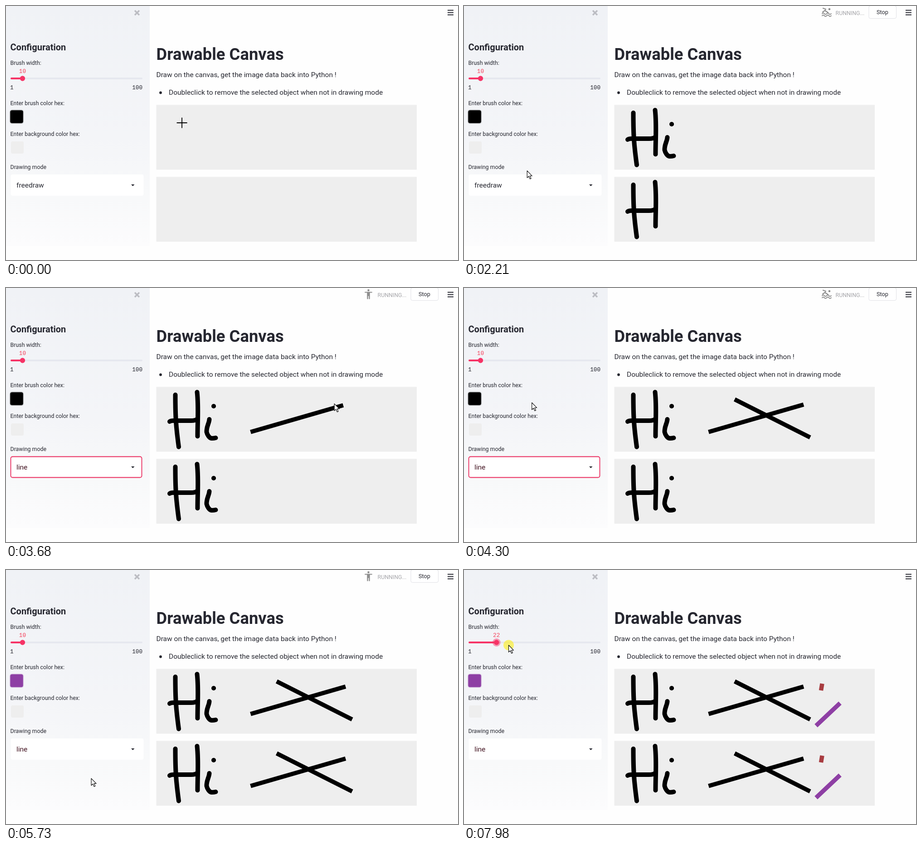
An HTML page for the animation above (8 s loop, 997 px wide and 561 px high).

```html
<!DOCTYPE html>
<html lang="en">
<head>
<meta charset="utf-8">
<title>Drawable Canvas</title>
<style>
  html, body { margin: 0; width: 100%; height: 100%; overflow: hidden; background: #fefefe; }
  svg { display: block; width: 100%; height: 100%; }
  text { font: 15.5px Roboto, sans-serif; fill: #262730; }
  .label { font-size: 12.4px; }
  .mono { font: 12.7px "Liberation Mono", monospace; }
  .h1 { font-size: 36.4px; font-weight: 700; }
  .h2 { font-size: 20px; font-weight: 700; }
  .menu { filter: drop-shadow(0 3px 6px rgba(0, 0, 0, .28)); }
  .muted { fill: #888a92; }
  .icon { fill: none; stroke: #8d8d8d; stroke-width: 1.8; stroke-linecap: round; stroke-linejoin: round; }
  .icon .solid { fill: #8d8d8d; stroke: none; }
  .ink { fill: none; stroke-width: 10; stroke-linecap: round; }
  .ink.line { stroke-width: 9.5; stroke-linecap: butt; }
  .pointer { fill: #fff; stroke: #000; stroke-width: 1.1; stroke-linejoin: round; }
</style>
</head>
<body>
<svg viewBox="0 0 997 561" preserveAspectRatio="none">
  <defs>
    <linearGradient id="side" x2="0" y2="1">
      <stop offset="0" stop-color="#f0f2f6"/>
      <stop offset=".55" stop-color="#f4f5f8"/>
      <stop offset=".8" stop-color="#f8f9fa"/>
      <stop offset="1" stop-color="#fcfcfd"/>
    </linearGradient>
  </defs>

  <rect width="317" height="530" fill="url(#side)"/>
  <path d="M284 10l10 10m0-10l-10 10" stroke="#bcbdc3" stroke-width="3.4"/>
  <text class="h2" x="9.5" y="97.5">Configuration</text>
  <text class="label" x="9.5" y="130">Brush width:</text>
  <rect x="10" y="158" width="291" height="4" rx="2" fill="#e6e8ef"/>
  <rect id="fill" x="10" y="158" height="4" rx="2" fill="#f63366"/>
  <circle id="halo" cy="160" r="9" fill="#f63366" opacity=".45"/>
  <circle id="thumb" cy="160" r="5.7" fill="#f63366"/>
  <text id="value" class="mono" y="147.5" text-anchor="middle" style="fill:#f4405a"></text>
  <text class="mono" x="9" y="184">1</text>
  <text class="mono" x="301" y="184" text-anchor="end">100</text>

  <text class="label" x="9.5" y="219">Enter brush color hex:</text>
  <rect id="swatch" x="9.5" y="230.5" width="28" height="28" rx="3.5"/>
  <text class="label" x="9.5" y="287">Enter background color hex:</text>
  <rect x="11" y="299" width="28" height="27" rx="3.5" fill="#eee"/>

  <text class="label" x="9.5" y="360">Drawing mode</text>
  <rect id="select" y="372" rx="4" fill="#fff"/>
  <text id="mode" x="23" y="401"></text>
  <path d="M276 394h7.5l-3.75 4z" fill="#262730"/>

  <text class="h1" x="331.5" y="119">Drawable Canvas</text>
  <text x="331.5" y="157">Draw on the canvas, get the image data back into Python !</text>
  <circle cx="341" cy="191.5" r="2.9" fill="#262730"/>
  <text x="359" y="196">Doubleclick to remove the selected object when not in drawing mode</text>
  <rect x="331.5" y="218.5" width="574.5" height="143" fill="#eee"/>
  <rect x="331.5" y="377.5" width="574.5" height="143" fill="#eee"/>
  <g id="upper"></g>
  <g id="lower" transform="translate(0 159)"></g>

  <path d="M974 9.5h13m-13 5h13m-13 5h13" stroke="#262730" stroke-width="1.8"/>
  <g id="running">
    <g class="icon">
      <circle class="solid" cx="799.5" cy="5" r="2.3"/>
      <path d="M792 9.5h15"/>
      <path d="M797.5 10v13.5m4-13.5v13.5m-2-13v6" stroke-width="2.4"/>
    </g>
    <g class="icon">
      <circle class="solid" cx="806" cy="7" r="2.3"/>
      <path d="M792 5l6 2-2 3 7 4.5m-12-1l5-3.5" stroke-width="2.2"/>
      <path d="M790 17q3-3 5 0t5 0 5 0 5 0M790 21.5q3-3 5 0t5 0 5 0 5 0"/>
    </g>
    <g class="icon">
      <circle cx="792.5" cy="18.7" r="4.6"/>
      <circle cx="807" cy="18.7" r="4.6"/>
      <circle class="solid" cx="802.5" cy="4.5" r="2.2"/>
      <path d="M808 11h-4l-3.5-3-4 4 4 3v5"/>
    </g>
    <text class="label" x="819.5" y="20" style="fill:#a6a6aa">RUNNING...</text>
    <rect x="893" y="-.5" width="60.5" height="28" rx="3.5" fill="#fff" stroke="#e0e1e6"/>
    <text x="910" y="18" style="font-size:12.7px">Stop</text>
  </g>

  <g id="menu">
    <rect class="menu" x="10" y="426" width="290" height="134" rx="3" fill="#fff"/>
    <rect id="hover" x="10" width="290" height="40" fill="#f0f2f6"/>
    <text x="25" y="459" style="font-size:16px;font-weight:700">freedraw</text>
    <text class="muted" x="25" y="499">line</text>
    <text class="muted" x="25" y="539">transform</text>
  </g>

  <g id="cursor">
    <path id="cross" d="M-11.5 0h23M0-11.5v23" stroke="#000" stroke-width="1.8"/>
    <circle id="press" r="11.5" fill="#ffee00" opacity=".55"/>
    <path id="arrow" class="pointer" d="M0 0v15.5l3.6-3.3 2.7 5.9 2.5-1.1-2.7-5.7h4.9z"/>
    <path id="hand" class="pointer" d="M-1.5 1.2q1.5-2.4 3 0v6l1-.8 2 .8 1.2-.2 1.5 1.2 1.8.2 1 1.5v4.5l-1.8 5.4h-8l-2.2-4-3.2-4q.2-2.4 2.4-1l1.3 1.4z"/>
  </g>
</svg>
<script>
const LOOP = 8000;
const INK_LAG = 45;      // ink trails the pointer
const SLIDER_LAG = 110;  // so does the slider
const SYNC = 750;        // delay until the lower canvas repeats a stroke
const RED = "#a83c40", PURPLE = "#8e3fa4";

const $ = id => document.getElementById(id);
const clamp = (v, lo, hi) => Math.min(hi, Math.max(lo, v));
const ease = p => p * p * (3 - 2 * p);
const show = (el, on) => el.setAttribute("visibility", on ? "inherit" : "hidden");
const set = (el, attrs) => { for (const k in attrs) el.setAttribute(k, attrs[k]); };

function makePath(attrs, parent) {
  const path = document.createElementNS("http://www.w3.org/2000/svg", "path");
  set(path, attrs);
  if (parent) parent.append(path);
  return path;
}

// A step is a press of the pointer along a path; between steps the pointer glides.
function step(from, to, d, extra) {
  const guide = makePath({ d });
  return { from, to, d, guide, length: guide.getTotalLength(), ...extra };
}
const click = (at, x, y, extra) => step(at, at + 80, `M${x} ${y}h.1`, extra);

function stroke(from, to, d, type, color = "#000") {
  const s = step(from, to, d, { type, reruns: true });
  const attrs = { class: `ink ${type}`, d, stroke: color };
  s.ink = makePath(attrs, $("upper"));
  s.copy = makePath(attrs, $("lower"));
  return s;
}
const free = (from, to, d) => stroke(from, to, d, "free");
const line = (from, to, d, color) => stroke(from, to, d, "line", color);

const open = click(2420, 40, 396);
const choose = click(3100, 92, 485, { reruns: true });
const swatch = click(4410, 20, 237);
const pickRed = click(5100, 130, 330, { reruns: true });
const pickPurple = click(5400, 160, 370, { reruns: true });
const drag = step(7720, LOOP, "M36.5 160L103 166.4");

const steps = [
  click(-80, 388, 258),
  free(120, 380, "M373.5 236C373.5 287 375 306 381 351"),
  free(500, 680, "M421.5 230C425 262 422.5 290 422.5 327.5"),
  free(800, 1020, "M361 295Q364 292.5 372 293H408Q417 293 421 290"),
  free(1360, 1470, "M448.5 290C448 299 442 306 442.5 318C444 325 449 332 454 332Q459 332 462.5 331"),
  free(1700, 1760, "M458 261h.1"),
  open, choose,
  line(3480, 3640, "M539.5 318L749 257.5"),
  line(3800, 4000, "M597 246L763.5 330"),
  swatch, pickRed, pickPurple,
  click(5640, 186, 461),
  line(6050, 6200, "M790 251L787.5 266", RED),
  line(6815, 7120, "M829.5 294L803 331L776.5 344", PURPLE),
  drag
];
const strokes = steps.filter(s => s.ink);

const progress = (s, t) => clamp((t - s.from) / (s.to - s.from), 0, 1);

function pointOn(s, t) {
  const { x, y } = s.guide.getPointAtLength(s.length * progress(s, t));
  return [x, y];
}

function cursorAt(t) {
  const i = steps.findIndex(s => t < s.to);
  const next = steps[i], prev = steps[i - 1];
  if (t >= next.from) return pointOn(next, t);
  const a = pointOn(prev, prev.to), b = pointOn(next, next.from);
  const p = ease((t - prev.to) / (next.from - prev.to));
  return a.map((v, k) => v + (b[k] - v) * p);
}

const chord = (s, t) => `M${pointOn(s, s.from)}L${pointOn(s, t)}`;

function drawInk(t) {
  for (const s of strokes) {
    const inkTime = t - INK_LAG;
    show(s.ink, inkTime >= s.from);
    show(s.copy, t >= s.to + SYNC);
    if (s.type === "line") {
      set(s.ink, { d: chord(s, inkTime) });
      set(s.copy, { d: chord(s, s.to) });
    } else {
      set(s.ink, { "stroke-dasharray": `${s.length * progress(s, inkTime) + .1} 500` });
    }
  }
}

function drawSlider(t) {
  const [pulled] = pointOn(drag, t - SLIDER_LAG);
  const value = Math.round(1 + (pulled - 10) / 291 * 99);
  const x = 10 + (value - 1) / 99 * 291;
  set($("fill"), { width: x - 10 });
  set($("thumb"), { cx: x });
  set($("halo"), { cx: x });
  set($("value"), { x });
  show($("halo"), t >= drag.from);
  $("value").textContent = value;
}

function drawSidebar(t, y) {
  const color = t < pickRed.from ? "#000" : t < pickPurple.from ? RED : PURPLE;
  $("swatch").style.fill = color;
  $("swatch").style.filter = `drop-shadow(0 0 1px ${color})`;

  const focus = t >= open.from && t < swatch.from;
  set($("select"), focus
    ? { x: 10.5, y: 372.5, width: 289, height: 46, stroke: "#ea2f60", "stroke-width": 1.8 }
    : { x: 10.5, y: 372, width: 293, height: 47, stroke: "none" });

  const chosen = t >= choose.to;
  $("mode").textContent = chosen ? "line" : "freedraw";
  $("mode").style.fill = chosen ? "#40101e" : "#262730";
  show($("menu"), t >= open.to && !chosen);
  set($("hover"), { y: y > 474 ? 474 : 434 });
}

function drawRunning(t) {
  show($("running"), steps.some(s => s.reruns && t >= s.to && t < s.to + SYNC + 100));
  const current = Math.floor(t / 170) % 3;
  document.querySelectorAll(".icon").forEach((icon, i) => show(icon, i === current));
}

function drawCursor(t, x, y) {
  const cross = t < open.from && x > 331 && y > 218 && y < 362;
  const inMenu = t >= open.to && t < choose.to;
  const onSwatch = x < 38 && y > 230 && y < 259;
  set($("cursor"), { transform: `translate(${x} ${y})` });
  show($("cross"), cross);
  show($("hand"), inMenu || onSwatch);
  show($("arrow"), !cross && !inMenu && !onSwatch);
  show($("press"), steps.some(s => t >= s.from && t < s.to));
}

function render(t) {
  const [x, y] = cursorAt(t);
  drawInk(t);
  drawSlider(t);
  drawSidebar(t, y);
  drawRunning(t);
  drawCursor(t, x, y);
}

const start = performance.now();
function tick(now) {
  render(Math.max(0, now - start) % LOOP);
  requestAnimationFrame(tick);
}
render(0);
requestAnimationFrame(tick);
</script>
</body>
</html>
```
